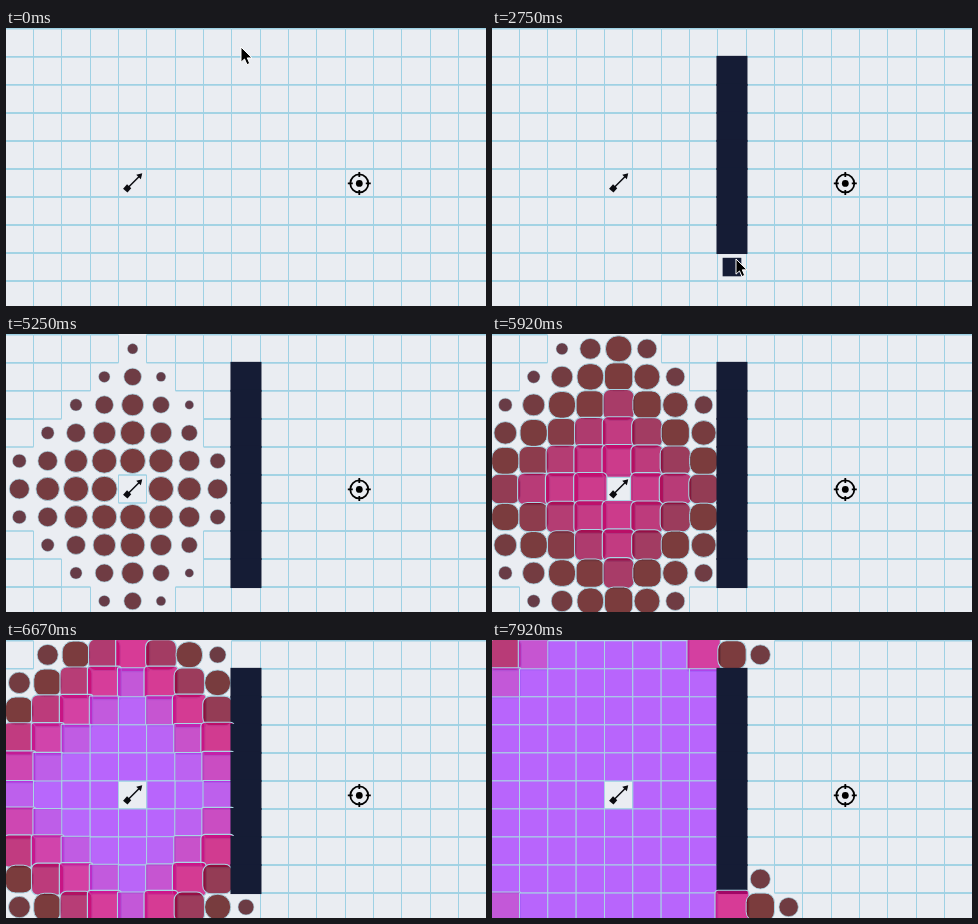
Recreate the animation shown at these times as an HTML page. Size 480 by 278 pixels, loop 8000 ms.

```html
<!DOCTYPE html>
<html lang="en">
<head>
<meta charset="utf-8">
<title>Grid search</title>
<style>
html, body { margin: 0; width: 100%; height: 100%; overflow: hidden; background: #eaedf2; }
svg { display: block; width: 100vw; height: 100vh; }
</style>
</head>
<body>
<svg id="stage" viewBox="0 0 480 278" preserveAspectRatio="none"></svg>
<script>
const LOOP = 8000, COLS = 17, ROWS = 10, W = 28.33, H = 28.03;
const START = { c: 4, r: 5 }, TARGET = { c: 12, r: 5 }, WALL_COL = 8;
const VISIT = 2000, BUILD = 360, POINTER_END = 3400;

// Keyframes of a visited cell: progress, scale, colour
const visitKeys = [
  { at: 0, scale: 0.3, rgb: [52, 0, 16] },
  { at: 0.5, scale: 1, rgb: [86, 0, 0] },
  { at: 0.75, scale: 1.2, rgb: [209, 1, 119] },
  { at: 1, scale: 1, rgb: [167, 57, 255] }
];
const wallKeys = [{ at: 0, scale: 0.3 }, { at: 0.5, scale: 1.2 }, { at: 1, scale: 1 }];

// Pointer tip
const pointerKeys = [
  { at: 0, x: 235, y: 19 }, { at: 570, x: 239, y: 30 }, { at: 1490, x: 249, y: 116 },
  { at: 1670, x: 250, y: 146 }, { at: 2750, x: 244, y: 231 }, { at: 2900, x: 242, y: 226 },
  { at: 3320, x: 186, y: 50 }
];

const svg = document.getElementById('stage');
function add(tag, attrs, parent = svg) {
  const el = document.createElementNS('http://www.w3.org/2000/svg', tag);
  set(el, attrs);
  parent.appendChild(el);
  return el;
}
function set(el, attrs) { for (const k in attrs) el.setAttribute(k, attrs[k]); }
const show = (el, on) => el.setAttribute('visibility', on ? 'visible' : 'hidden');
const mix = (a, b, p) => a + (b - a) * p;
const lineX = c => Math.round(c * W - 1.33) + 0.5;
const lineY = r => 0.8 + r * H;
const midX = c => (c + 0.5) * W - 0.83;
const midY = r => 0.8 + (r + 0.5) * H;

// cubic-bezier(0, 0, .58, 1)
function easeOut(x) {
  let lo = 0, hi = 1;
  for (let i = 0; i < 18; i++) {
    const t = (lo + hi) / 2;
    if (1.74 * t * t - 0.74 * t * t * t < x) lo = t; else hi = t;
  }
  return 3 * lo * lo - 2 * lo * lo * lo;
}

// The two keys around p, and the linear progress between them
function segment(keys, p) {
  let i = 0;
  while (i < keys.length - 2 && p >= keys[i + 1].at) i++;
  const a = keys[i], b = keys[i + 1];
  return { a, b, q: Math.min(1, (p - a.at) / (b.at - a.at)) };
}

const isWall = (c, r) => c === WALL_COL && r >= 1 && r <= 8;
const wallTime = r => 570 + 305 * (r - 1);

// Steps from the start, going round the wall for cells behind it
function distance(c, r) {
  const dx = Math.abs(c - START.c);
  return c > WALL_COL
    ? dx + Math.min(START.r + r, 2 * (ROWS - 1) - START.r - r)
    : dx + Math.abs(r - START.r);
}

// Each ring is swept from left to right; the area found grows evenly
function visitTime(c, r) {
  const d = distance(c, r);
  if (!d) return Infinity;
  const wave = d + (c - START.c + d) / (2 * d);
  return 4560 + 31 * (wave - 1) ** 2;
}

const frames = add('g', { stroke: '#9fd1e4', fill: 'none' });
const icons = add('g', {});
const blocks = add('g', {});
const cells = [];
for (let r = 0; r < ROWS; r++) {
  for (let c = 0; c < COLS; c++) {
    const x = lineX(c), x2 = lineX(c + 1), y = lineY(r), y2 = lineY(r + 1);
    const wall = isWall(c, r), begin = wall ? wallTime(r) : visitTime(c, r);
    const frame = add('g', {}, frames);
    add('path', { d: `M${x} ${y}H${x2}M${x} ${y2}H${x2}`, 'stroke-width': 1.5 }, frame);
    add('path', { d: `M${x} ${y}V${y2}M${x2} ${y}V${y2}`, 'stroke-width': 1 }, frame);
    if (begin > LOOP) continue;
    const style = wall ? { fill: '#151c35' } : { stroke: '#a9d5e4', 'fill-opacity': 0.75 };
    cells.push({ cx: midX(c), cy: midY(r), wall, begin, frame, block: add('rect', style, blocks) });
  }
}

const place = p => `translate(${midX(p.c)} ${midY(p.r)})`;
const arrow = add('g', { transform: place(START), fill: '#0b0b10' }, icons);
add('path', { d: 'M-5 5L8 -8', stroke: '#0b0b10', 'stroke-width': 1.5 }, arrow);
add('path', { d: 'M9.6 -9.6L8.2 -3.6L3.6 -8.2Z' }, arrow);
add('path', { d: 'M-5.6 1.4L-1.4 5.4L-5.2 9.6L-9.6 5.8Z' }, arrow);

const ring = add('g', { transform: place(TARGET), stroke: '#000', 'stroke-width': 1.8, fill: 'none' }, icons);
add('circle', { cy: 0.5, r: 9 }, ring);
add('circle', { cy: 0.5, r: 3.4, fill: '#000', stroke: 'none' }, ring);
add('path', { d: 'M-11.5 .5h5M6.5 .5h5M0 -11v5M0 7v5' }, ring);

const pointer = add('path', {
  d: 'M0 0V15.2L3.5 12L6 17.6L8.7 16.4L6.3 10.9H11Z',
  fill: '#000', stroke: '#fff', 'stroke-width': 1, 'stroke-linejoin': 'round'
});

function drawCell({ cx, cy, wall, begin, frame, block }, t) {
  const on = t >= begin;
  show(frame, !on);
  show(block, on);
  if (!on) return;
  const p = Math.min(1, (t - begin) / (wall ? BUILD : VISIT));
  const { a, b, q } = segment(wall ? wallKeys : visitKeys, p);
  const e = easeOut(q), s = mix(a.scale, b.scale, e);
  const w = (wall ? mix(28.6, 31, p) : W) * s, h = (wall ? mix(28.4, 30, p) : H) * s;
  set(block, { x: cx - w / 2, y: cy - h / 2, width: w, height: h });
  if (wall) return;
  const round = Math.min(0.5, 1 - easeOut(p));
  set(block, {
    rx: w * round, ry: h * round, 'stroke-width': s,
    fill: `rgb(${a.rgb.map((v, i) => Math.round(mix(v, b.rgb[i], e)))})`
  });
}

function drawPointer(t) {
  show(pointer, t < POINTER_END);
  const { a, b, q } = segment(pointerKeys, t);
  set(pointer, { transform: `translate(${mix(a.x, b.x, q)} ${mix(a.y, b.y, q)})` });
}

const origin = performance.now();
function tick() {
  const t = (performance.now() - origin) % LOOP;
  cells.forEach(cell => drawCell(cell, t));
  drawPointer(t);
  requestAnimationFrame(tick);
}
tick();
</script>
</body>
</html>
```
